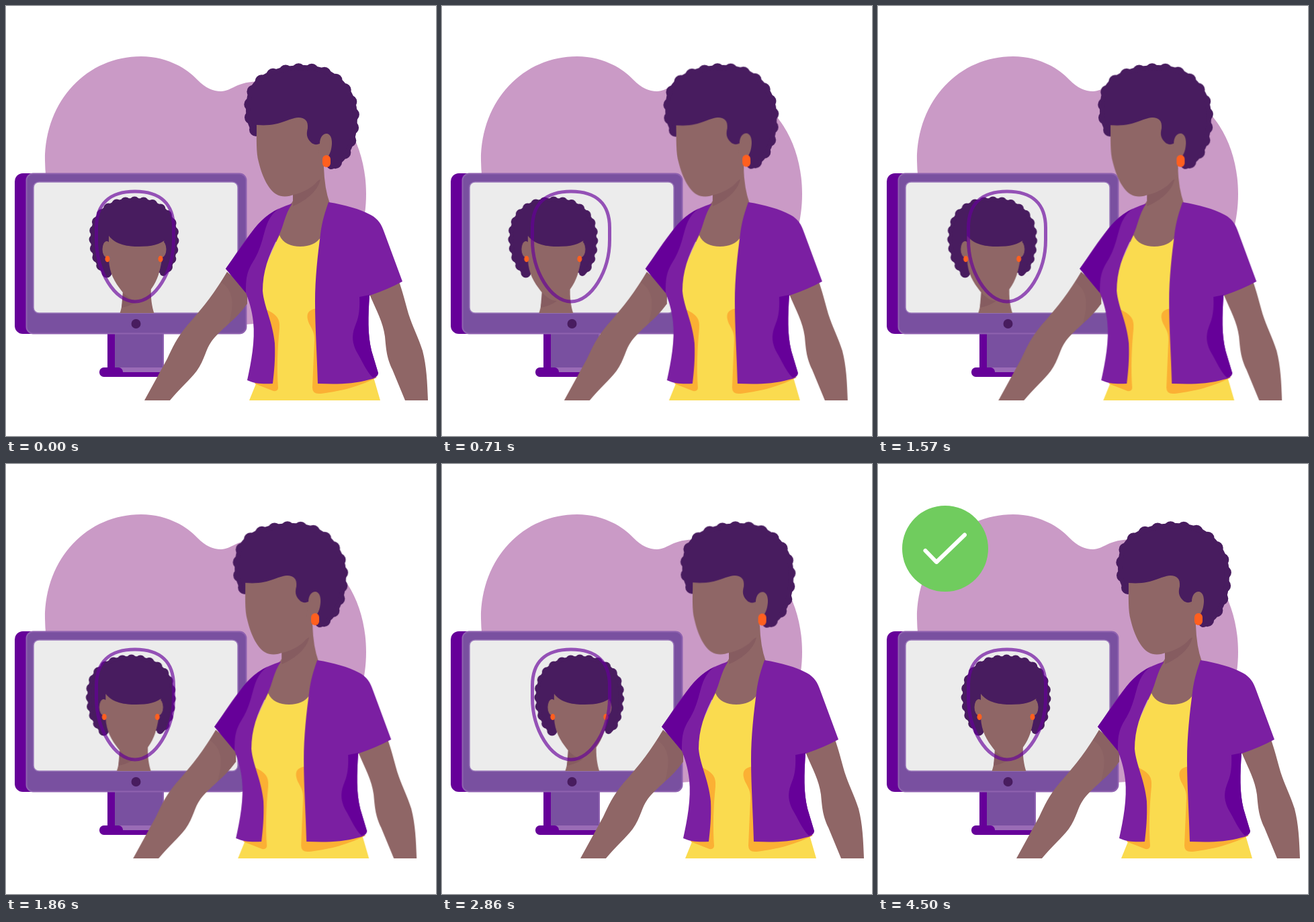
These frames come from a looping animation (640 px wide and 640 px high, 6 s). An HTML page:

```html
<!DOCTYPE html>
<html lang="en">
<head>
<meta charset="utf-8">
<title>Face check</title>
<style>
  html, body { margin: 0; width: 100%; height: 100%; overflow: hidden; background: #fff; }
  svg { display: block; width: 100%; height: 100%; }

  .skin { fill: #8f6666; }
  .skin-shade { fill: #865c60; }
  .arm-shade { fill: #8a6163; }
  .hair { fill: #481c5f; }
  .curls { fill: none; stroke: #481c5f; stroke-linecap: round; }
  .deep { fill: #660099; }
  .jacket { fill: #7b1fa2; }
  .panel { fill: #7950a0; }
  .shirt { fill: #fadb4f; }
  .fold { fill: #fbb034; }
  .orange { fill: #ff5f1f; }

  .woman, .head, .face, .badge, .ring, .disc, .tick {
    animation: 6s linear infinite;
  }
  .woman { animation-name: sway; }
  .face { animation-name: align; }
  .head { animation-name: tilt; transform-origin: 430px 200px; }
  .badge { animation-name: pop; transform-origin: 100px 126px; }
  .ring { animation-name: trace; }
  .disc { animation-name: flood; }
  .tick { animation-name: check; }

  @keyframes sway {
    0% { transform: translateX(0); animation-timing-function: cubic-bezier(.333, 0, .667, 1); }
    20.24% { transform: translateX(-38.4px); animation-timing-function: cubic-bezier(.3, .3, .7, .95); }
    42.86%, 100% { transform: translateX(0); }
  }
  @keyframes align {
    0% { transform: translateX(0); animation-timing-function: cubic-bezier(.333, 0, .667, 1); }
    20.24% { transform: translateX(-40px); animation-timing-function: cubic-bezier(.3, .34, .7, .95); }
    42.86% { transform: translateX(21px); animation-timing-function: cubic-bezier(.3, .33, .7, .95); }
    59.52%, 100% { transform: translateX(0); }
  }
  @keyframes tilt {
    0% { transform: rotate(0); animation-timing-function: cubic-bezier(.333, 0, .667, 1); }
    20.24% { transform: rotate(-1deg); animation-timing-function: cubic-bezier(.3, .33, .7, .95); }
    42.86% { transform: rotate(1deg); animation-timing-function: cubic-bezier(.3, .33, .7, .95); }
    59.52%, 100% { transform: rotate(0); }
  }
  @keyframes pop {
    0%, 59.52% { transform: scale(1); animation-timing-function: ease-in-out; }
    64.29% { transform: scale(.79); animation-timing-function: ease-in-out; }
    70.24% { transform: scale(1.19); animation-timing-function: ease-in-out; }
    75%, 100% { transform: scale(1); }
  }
  @keyframes trace {
    0%, 52.3% { opacity: 0; stroke-dasharray: 0 200; }
    52.31% { opacity: 1; stroke-dasharray: 0 200; animation-timing-function: ease-in-out; }
    59.52%, 100% { opacity: 1; stroke-dasharray: 101 200; }
  }
  @keyframes flood {
    0%, 64.3% { opacity: 0; }
    67%, 100% { opacity: 1; }
  }
  @keyframes check {
    0%, 69% { opacity: 0; stroke-dasharray: 0 200; }
    69.01% { opacity: 1; stroke-dasharray: 0 200; animation-timing-function: ease-out; }
    74%, 100% { opacity: 1; stroke-dasharray: 101 200; }
  }
</style>
</head>
<body>
<svg viewBox="0 0 640 640">
  <defs>
    <clipPath id="screen"><rect x="41" y="262" width="304" height="195" rx="8"/></clipPath>
    <path id="crown" d="M372 184C362 168 363 150 366 135C371 110 402 95 444 95C490 95 516 130 516 165
      C516 200 505 225 484 236"/>
    <path id="small-crown" d="M150 397C134 380 131 360 131 344C131 310 155 291 191 291
      C228 291 250 312 250 345C250 365 246 385 234 397"/>
  </defs>

  <path fill="#ca9ac6" d="M58 230C58 139 122 75 201 75C236 75 266 90 285 110C297 122 308 127 320 127
    C336 127 342 112 380 112C480 112 536 188 536 280C536 385 460 474 350 474L150 474C95 400 59 310 58 230Z"/>

  <g>
    <rect class="deep" x="151" y="480" width="14" height="66"/>
    <rect class="panel" x="162" y="480" width="72" height="62"/>
    <path d="M234 487V540" stroke="#8f62b0" stroke-width="2"/>
    <rect x="165" y="538" width="72" height="8" fill="#9a6cb6"/>
    <rect class="deep" x="145" y="545" width="92" height="7"/>
    <rect class="deep" x="139" y="538" width="35" height="14" rx="6.500"/>
    <rect class="deep" x="13" y="249" width="60" height="239" rx="12"/>
    <rect class="panel" x="30.500" y="249.500" width="327" height="238" rx="10" stroke="#8f62b0" stroke-width="2"/>
    <rect x="41" y="262" width="304" height="195" rx="8" fill="#ececec" stroke="#9a78ba" stroke-width="1.500"/>
    <circle cx="193.500" cy="473" r="7" fill="#481c5f"/>
  </g>

  <g clip-path="url(#screen)">
    <g class="face">
      <use class="curls" href="#small-crown" stroke-width="15" stroke-dasharray="0 13.500"/>
      <use class="curls" href="#small-crown" stroke-width="10"/>
      <use class="hair" href="#small-crown"/>
      <path class="skin" d="M174 415C175 435 173 447 169 459H221C217 447 215 435 216 415Z"/>
      <path class="skin-shade" d="M174 424C180 434 188 439 196 439C186 446 177 448 172 449Z"/>
      <ellipse class="skin" cx="150" cy="362" rx="6.500" ry="12"/>
      <ellipse class="skin" cx="232" cy="362" rx="6.500" ry="12"/>
      <path class="skin" d="M153 335V378C154 398 162 411 172 424C180 434 188 438 195 437
        C204 436 211 428 217 420C225 409 229 396 232 378L237 335Z"/>
      <path class="hair" d="M153 342C164 356 182 358 198 358C216 358 230 355 238 347V310H153Z"/>
      <ellipse class="orange" cx="151" cy="376.500" rx="3.500" ry="4.700"/>
      <ellipse class="orange" cx="230" cy="376.500" rx="3.500" ry="4.700"/>
    </g>
  </g>
  <path fill="none" stroke="#660099" stroke-opacity=".66" stroke-width="5"
    d="M192 276C230 276 249.500 295 249.500 330V348C249.500 395 222 440 192 440
    C162 440 134.500 395 134.500 348V330C134.500 295 154 276 192 276Z"/>

  <g class="woman">
    <path class="skin" d="M329 396C312 424 296 446 270 475C254 494 248 508 240 525L206 587H244
      C258 570 274 556 284 543C296 526 297 511 306 499C318 483 340 468 359 443V420Z"/>
    <path class="arm-shade" d="M320 411C337 422 341 440 332 472C342 464 351 454 359 443V420L329 396Z"/>
    <path class="skin" d="M541 429C552 455 561 470 564 492C566 514 567 524 575 541L594 587H628
      C627 560 626 536 620 513C614 494 605 477 599 458C594 440 591 428 585 410Z"/>

    <path class="skin" d="M427 270V290Q425 296 410 303L400 350L440 370L474 350L482 294Q474 272 473 240Z"/>
    <path class="skin-shade" d="M427 280V298C448 289 464 275 468 258Z"/>

    <path class="shirt" d="M407 341C412 353 424 358 438 358C452 358 462 353 468 345L478 440L548 556L557 587H362
      L373 560L380 400Z"/>
    <path class="fold" d="M388 452C404 460 408 466 407 480C404 510 403 540 405 568Q405 574 398 573L370 562L385 540Z"/>
    <path class="fold" d="M468 450C452 450 447 456 449 466C451 477 460 482 459 498L456 568Q456 578 468 577
      C492 574 520 569 552 553L500 530Z"/>

    <path class="jacket" d="M426 294C414 312 414 326 406 342C390 372 382 396 382 424C384 448 397 470 400 502
      C401 526 399 545 397 562C382 563 370 562 359 557C365 530 371 498 368 470C366 452 362 440 357 427L327 391
      C342 370 354 350 370 331C384 314 400 302 426 294Z"/>
    <path class="deep" d="M407 301C384 312 372 327 360 345L327 391L357 427C357 406 358 396 368 380
      C382 358 383 336 390 321Q396 308 407 301Z"/>
    <path class="jacket" d="M480 292C505 296 526 302 543 311C554 317 559 325 563 337L590 410Q568 422 541 431
      C539 462 538 488 544 513L554 547Q553 554 541 556C516 563 492 563 464 562C463 520 460 480 460 440
      C460 405 464 370 468 340C470 322 475 306 480 292Z"/>
    <path class="deep" d="M541 430L526 433C527 456 524 466 519 478C514 492 516 502 521 513
      C531 530 537 545 546 553Q554 551 554 546L544 513C538 488 539 462 541 430Z"/>

    <g class="head">
      <use class="curls" href="#crown" stroke-width="20" stroke-dasharray="0 19.500"/>
      <use class="curls" href="#crown" stroke-width="14"/>
      <path class="skin" d="M373 174C373 198 372 218 376 232C382 257 392 274 402 280C412 286 422 283 428 281
        C450 276 469 262 473 242V190L450 160Z"/>
      <path class="hair" d="M373 192C362 168 363 150 366 135C371 110 402 95 444 95C490 95 516 130 516 165
        C516 200 505 225 484 238L475 238L468 204C464 207 458 207 454 203C447 196 447 190 449 182
        C450 171 445 166 435 166C419 167 408 180 373 177Z"/>
      <path class="skin" d="M467 205C467 194 473 189 478 190C486 192 486 205 484 213C482 222 477 227 474 236L464 228Z"/>
      <rect class="orange" x="471" y="222" width="12" height="18" rx="6"/>
    </g>
  </g>

  <g class="badge">
    <circle class="disc" cx="100" cy="126" r="64" fill="#70cc5e"/>
    <circle class="ring" cx="100" cy="126" r="60.500" pathLength="100" transform="rotate(-90 100 126)"
      fill="none" stroke="#70cc5e" stroke-width="5.500" stroke-linecap="round"/>
    <path class="tick" d="M70.500 129L87 146L129 105.500" pathLength="100"
      fill="none" stroke="#fff" stroke-width="6" stroke-linecap="round" stroke-linejoin="round"/>
  </g>
</svg>
<script>
  // Plays the keyframes at 14 pictures per second.
  const LOOP = 6000, STEP = 1000 / 14;
  const anims = document.getAnimations();
  const start = performance.now();

  function draw() {
    const time = (performance.now() - start + 5) % LOOP;
    const held = Math.floor(time / STEP) * STEP;
    for (const anim of anims) anim.currentTime = held;
    requestAnimationFrame(draw);
  }

  for (const anim of anims) anim.pause();
  draw();
</script>
</body>
</html>
```
